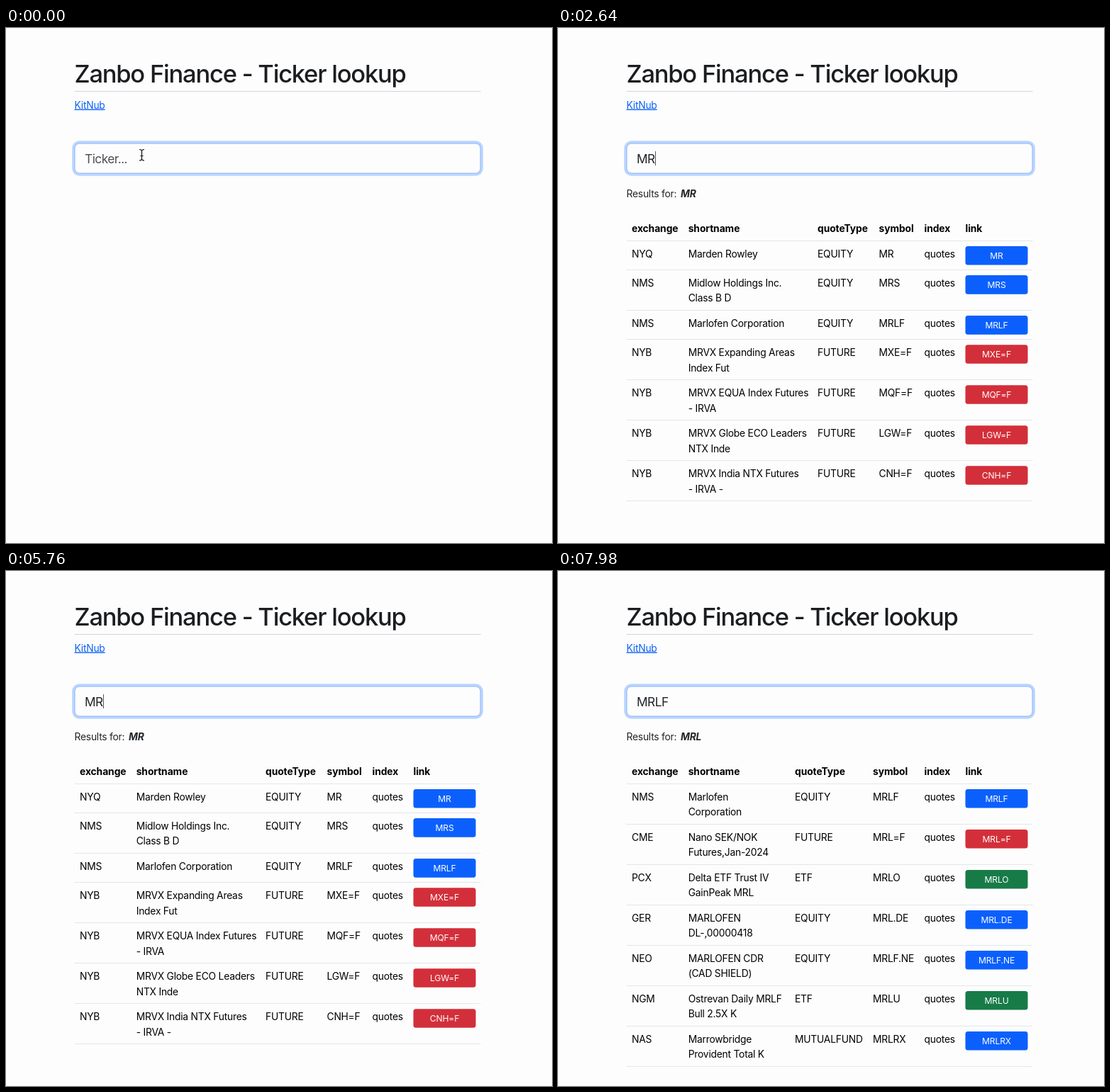
Recreate the animation shown at these times as an HTML page. Size 770 by 727 pixels, loop 8000 ms.

```html
<!DOCTYPE html>
<html lang="en">
<head>
<meta charset="utf-8">
<title>Ticker lookup</title>
<style>
  html, body { margin: 0; width: 100%; height: 100%; overflow: hidden; background: #fdfdfd; }
  svg { display: block; width: 770px; height: 727px; }
  text {
    font-family: Inter, "Liberation Sans", sans-serif;
    font-optical-sizing: none;
    font-size: 13.85px;
    font-weight: 430;
    letter-spacing: -.017em;
    fill: #000;
  }
  .title { font-size: 34.5px; font-weight: 500; letter-spacing: -.0355em; fill: #1b1d20; }
  .link { fill: #0b62f8; text-decoration: underline; }
  .entry { font-size: 17.3px; letter-spacing: -.03em; fill: #212529; }
  .hint { fill: #4b4e52; }
  .note { fill: #212529; }
  .query { fill: #212529; font-weight: 700; font-style: italic; }
  .head { font-weight: 700; letter-spacing: -.006em; }
  .button { font-size: 12.1px; letter-spacing: -.012em; text-anchor: middle; fill: #fff; }
  .rule { stroke: #e3e6ea; stroke-width: 1; }
</style>
</head>
<body>
<svg viewBox="0 0 770 727">
  <text class="title" x="96.5" y="77">Zanbo Finance - Ticker lookup</text>
  <path d="M96.5 89.5H669.5" stroke="#cfd3d9"/>
  <text class="link" x="96.5" y="113.5">KitNub</text>
  <rect x="93.2" y="159.2" width="579.6" height="49.6" rx="10.5" fill="#bbd5fe"/>
  <rect x="97" y="163" width="572" height="42" rx="6.5" fill="#fdfdfd" stroke="#86b7fe"/>
  <text class="entry" id="entry" x="111" y="191"></text>
  <rect id="caret" y="174" width="1" height="20" fill="#555"/>
  <path id="pointer" d="M188 171.5q3.5 0 3.5 2.5q0-2.5 3.5-2.5M191.5 173.5V185.5M188 187q3.5 0 3.5-2.5q0 2.5 3.5 2.5M189.5 180.5h4"
        fill="none" stroke="#111" stroke-width="1.2"/>
  <g id="results"></g>
</svg>
<script>
const LOOP = 8000, BLINK = 520;
const COLORS = { EQUITY: '#0b60fd', FUTURE: '#d32f3a', ETF: '#177b48', MUTUALFUND: '#0b60fd' };
const HEADS = ['exchange', 'shortname', 'quoteType', 'symbol', 'index', 'link'];
const WIDE = [104, 183.7, 366, 452.5, 516.5, 574.5];
const NARROW = [104, 183.7, 334, 444, 516.5, 574.5];

// Rows: exchange | name (a slash with spaces breaks the line) | type | symbol
const tables = [
  { query: 'M', from: 1660, to: 2500, columns: WIDE, rows: `
NYB|Cocoa #47 Mar 24|FUTURE|CK=F
NYM|Port Delvarn LDN / Ethane (OBRA)|FUTURE|D0=F
CMX|Nano Orvium / Futures,Jan-2024|FUTURE|MRC=F
NYM|E-nano Shale Oil / Futures,Oct-20|FUTURE|QW=F
NYQ|Mordle Inc|EQUITY|M
NMS|Midlow Holdings Inc. / Class B D|EQUITY|MRS
NGM|H/k Discretionary Yields / ETF|EQUITY|XVEL` },
  { query: 'MR', from: 2500, to: 7300, columns: WIDE, rows: `
NYQ|Marden Rowley|EQUITY|MR
NMS|Midlow Holdings Inc. / Class B D|EQUITY|MRS
NMS|Marlofen Corporation|EQUITY|MRLF
NYB|MRVX Expanding Areas / Index Fut|FUTURE|MXE=F
NYB|MRVX EQUA Index Futures / - IRVA|FUTURE|MQF=F
NYB|MRVX Globe ECO Leaders / NTX Inde|FUTURE|LGW=F
NYB|MRVX India NTX Futures / - IRVA -|FUTURE|CNH=F` },
  { query: 'MRL', from: 7300, to: LOOP, columns: NARROW, rows: `
NMS|Marlofen / Corporation|EQUITY|MRLF
CME|Nano SEK/NOK / Futures,Jan-2024|FUTURE|MRL=F
PCX|Delta ETF Trust IV / GainPeak MRL|ETF|MRLO
GER|MARLOFEN / DL-,00000418|EQUITY|MRL.DE
NEO|MARLOFEN CDR / (CAD SHIELD)|EQUITY|MRLF.NE
NGM|Ostrevan Daily MRLF / Bull 2.5X K|ETF|MRLU
NAS|Marrowbridge / Provident Total K|MUTUALFUND|MRLRX` }
];

const typing = [
  { at: 0, text: '' },
  { at: 840, text: 'M' },
  { at: 1555, text: 'MR' },
  { at: 6440, text: 'MRL' },
  { at: 7420, text: 'MRLF' }
];

const $ = id => document.getElementById(id);
const entry = $('entry'), caret = $('caret'), pointer = $('pointer');

function add(parent, tag, attributes, content = '') {
  const node = document.createElementNS('http://www.w3.org/2000/svg', tag);
  for (const key in attributes) node.setAttribute(key, attributes[key]);
  node.textContent = content;
  return parent.appendChild(node);
}
const label = (parent, x, y, content, style = '') => add(parent, 'text', { x, y, class: style }, content);
const rule = (parent, y) => add(parent, 'path', { d: `M96.5 ${Math.floor(y) + .5}H669.5`, class: 'rule' });

function buildTable({ query, columns, rows }) {
  const group = add($('results'), 'g', {});
  label(group, 96.5, 238.7, 'Results for:', 'note');
  label(group, 173, 238.7, query, 'query');
  HEADS.forEach((head, i) => label(group, columns[i], 288, head, 'head'));
  let top = 300.6;
  rule(group, top);
  for (const row of rows.trim().split('\n')) {
    const [exchange, name, type, symbol] = row.split('|');
    const lines = name.split(' / ');
    const base = top + 23.4;
    label(group, columns[0], base, exchange);
    lines.forEach((line, i) => label(group, columns[1], base + i * 21.3, line));
    [type, symbol, 'quotes'].forEach((cell, i) => label(group, columns[i + 2], base, cell));
    add(group, 'rect', { x: columns[5], y: top + 7.4, width: 88, height: 26.6, rx: 3.5, fill: COLORS[type] });
    label(group, columns[5] + 44, top + 25.2, symbol, 'button');
    top += lines.length > 1 ? 57 : 41.1;
    rule(group, top);
  }
  return group;
}
tables.forEach(table => table.group = buildTable(table));

const show = (node, on) => node.style.visibility = on ? 'visible' : 'hidden';

function draw(time) {
  const { at, text } = typing.filter(key => key.at <= time).pop();
  entry.textContent = text || 'Ticker...';
  entry.classList.toggle('hint', !text);
  caret.setAttribute('x', Math.round(111 + (text ? entry.getComputedTextLength() : 0)));
  show(caret, text ? (time - at) % (2 * BLINK) < BLINK : time >= 300 && time < 820);
  show(pointer, !text);
  tables.forEach(({ group, from, to }) => show(group, time >= from && time < to));
}

const start = performance.now();
function tick() {
  draw((performance.now() - start) % LOOP);
  requestAnimationFrame(tick);
}
tick();
</script>
</body>
</html>
```
